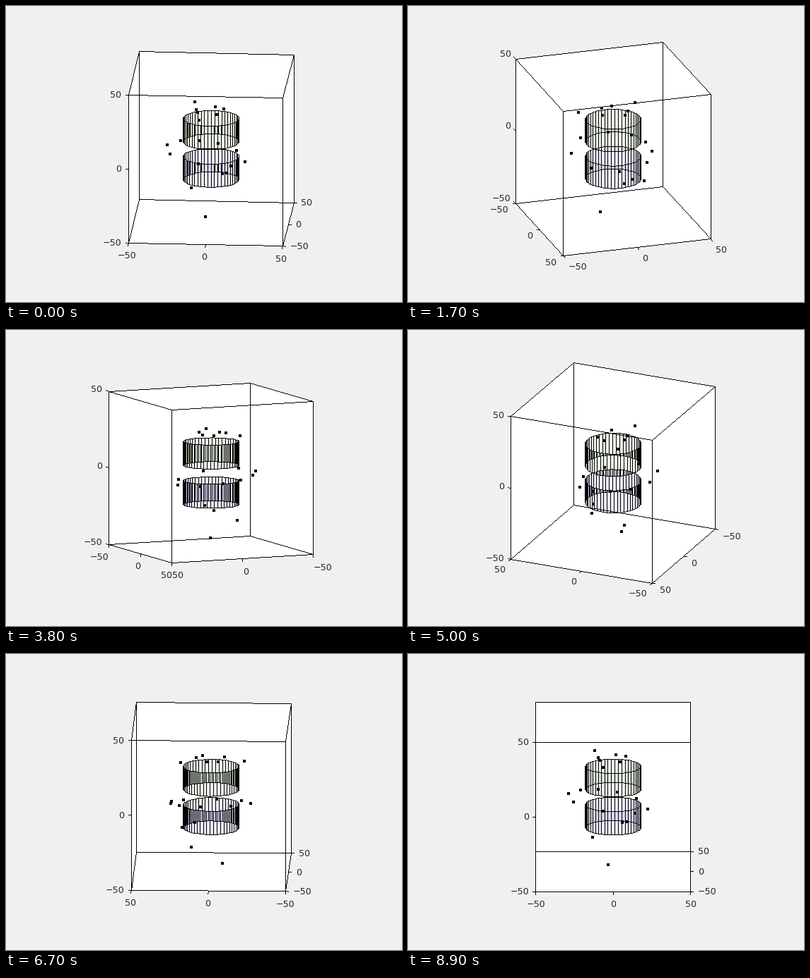
A matplotlib script that plays this animation: 560x420 px, repeating every 9 s.

```python
import numpy as np
import matplotlib.pyplot as plt
from matplotlib.animation import FuncAnimation
from matplotlib.collections import PolyCollection

W, H, DPI = 560, 420, 100
FRAMES, INTERVAL = 90, 100
CX, CY, SCALE = 289.8, 202.4, 2.19      # screen centre, pixels per unit
LIM = 50
RADIUS, SIDES = 18, 50
TICK, PAD = 4, 10                       # tick length, label gap
DROP, BASELINE = 8, 4                   # label offsets below the gap

CORNERS = LIM * np.array([(-1, -1), (1, -1), (1, 1), (-1, 1)])


def polar(deg, r, z):
    t = np.radians(deg)
    return np.column_stack(np.broadcast_arrays(r * np.cos(t), r * np.sin(t), z))


def scatter_points():
    """A tight ring on top, a wide tilted ring, and a falling spiral."""
    k = np.arange(7)
    top = polar(34 + 44 * k, 14 + 8.5 * np.cos(2 * np.pi * (k - 2) / 3), 25.6)
    k = np.arange(9)
    deg = 50 + 38 * k - 34 * np.sin(np.pi * k / 8.5) ** 2
    tilt = np.cos(np.radians(deg))
    middle = polar(deg, 26 - 3.5 * tilt, -3.5 - 4 * tilt)
    k = np.arange(4)
    low = polar(50 + 22 * k**2, 14 + 10 * k - 4 * k**2, -19.5 - 2.7 * k**2)
    return np.vstack([top, middle, low])


def tube(z0, z1):
    t = np.linspace(0, 360, SIDES + 1)
    low, top = polar(t, RADIUS, z0), polar(t, RADIUS, z1)
    return np.stack([low[:-1], low[1:], top[1:], top[:-1]], 1)


def project(p, az, el):
    """Orthographic view of 3D points, in screen pixels."""
    x, y, z = np.moveaxis(np.asarray(p, float), -1, 0)
    ca, sa, ce, se = np.cos(az), np.sin(az), np.cos(el), np.sin(el)
    sx = CX + SCALE * (x * ca + y * sa)
    sy = CY + SCALE * ((x * sa - y * ca) * se - z * ce)
    return np.stack([sx, sy], -1)


def unit(v):
    return v / max(np.hypot(*v), 1e-9)


def name(v):
    return f"\u2212{-v:.0f}" if v < 0 else f"{v:.0f}"


def stroke(a, b):
    """One-pixel hard line on the ink layer."""
    a, b = np.rint(a), np.rint(b)
    n = int(np.abs(b - a).max()) + 1
    x, y = np.rint(np.linspace(a, b, n)).astype(int).T
    ink[y, x, 3] = 255


def label_style(edge, side):
    """Horizontal alignment and vertical drop for a floor axis label."""
    slope = abs(edge[1]) / max(abs(edge[0]), 1e-9)
    if slope > np.tan(np.radians(60)):
        return side, 0
    return ("center" if slope < 0.05 else side), DROP


def tick_dir(edge, other):
    """Tick along the other floor axis, or straight down if too parallel."""
    (ex, ey), (ox, oy) = unit(edge), unit(other)
    return unit(other) if abs(ex * oy - ey * ox) > 0.5 else np.array([0.0, 1.0])


fig = plt.figure(figsize=(W / DPI, H / DPI), dpi=DPI, facecolor="#f0f0f0")
ax = fig.add_axes([0, 0, 1, 1])
ax.axis("off")

walls = ax.add_collection(PolyCollection([], facecolors="white", zorder=1))
tubes = []
for z0, z1, rgb in [(-20.6, -5, (0.2, 0.2, 0.7)), (5, 20.6, (0.35, 0.6, 0.2))]:
    faces = PolyCollection([], facecolors=[(*rgb, 0.1)], edgecolors="none", zorder=2)
    tubes.append((ax.add_collection(faces), tube(z0, z1)))

ink = np.zeros((H, W, 4), np.uint8)
layer = ax.imshow(ink, interpolation="nearest", aspect="auto", zorder=3)
ax.set_xlim(-0.5, W - 0.5)
ax.set_ylim(H - 0.5, -0.5)

labels = [ax.text(0, 0, "", family="DejaVu Sans", size=9.1, color="#262626",
                  va="baseline", zorder=4) for _ in range(9)]
points = scatter_points()


def draw_box(low, top):
    walls.set_verts([[top[0], top[3], top[2], low[2], low[1], low[0]]])
    for k in range(4):
        n = (k + 1) % 4
        stroke(low[k], low[n])
        stroke(top[k], top[n])
        stroke(low[k], top[k])


def draw_axis(a, b, view, d, style, texts):
    ha, drop = style
    moving = np.argmax(np.abs(b - a))
    for p3, text in zip(np.linspace(a, b, 3), texts):
        p = project(p3, *view)
        stroke(p, p + TICK * d)
        x, y = p + PAD * d
        text.set_position((x, y + drop + BASELINE))
        text.set_text(name(p3[moving]))
        text.set_ha(ha)


def update(i):
    az = np.radians(4 * (i + 1))
    el = np.radians(15 + 10 * np.sin(2 * az))
    view = az, el
    ink[:] = 0

    # corners in order: left, front, right, back
    ring = np.roll(CORNERS, -(4 * (i + 1) // 90), axis=0)
    low3, top3 = (np.column_stack([ring, np.full(4, z)]) for z in (-LIM, LIM))
    low, top = project(low3, *view), project(top3, *view)
    draw_box(low, top)

    to_left, to_right = low[0] - low[1], low[2] - low[1]
    draw_axis(low3[0], low3[1], view, tick_dir(to_left, -to_right),
              label_style(to_left, "right"), labels[:3])
    draw_axis(low3[1], low3[2], view, tick_dir(to_right, -to_left),
              label_style(to_right, "left"), labels[3:6])
    draw_axis(low3[0], top3[0], view, unit(to_left), ("right", 0), labels[6:])

    for faces, quads in tubes:
        flat = project(quads, *view)
        faces.set_verts(flat)
        for a, b, c, d in flat:
            stroke(a, b)
            stroke(b, c)
            stroke(c, d)

    for x, y in np.rint(project(points, *view)).astype(int):
        ink[y - 2:y + 2, x - 2:x + 2, 3] = 255
    layer.set_data(ink)
    return [walls, layer, *labels, *(f for f, _ in tubes)]


anim = FuncAnimation(fig, update, frames=FRAMES, interval=INTERVAL,
                     repeat=True, repeat_delay=0, blit=False)
plt.show()
```
